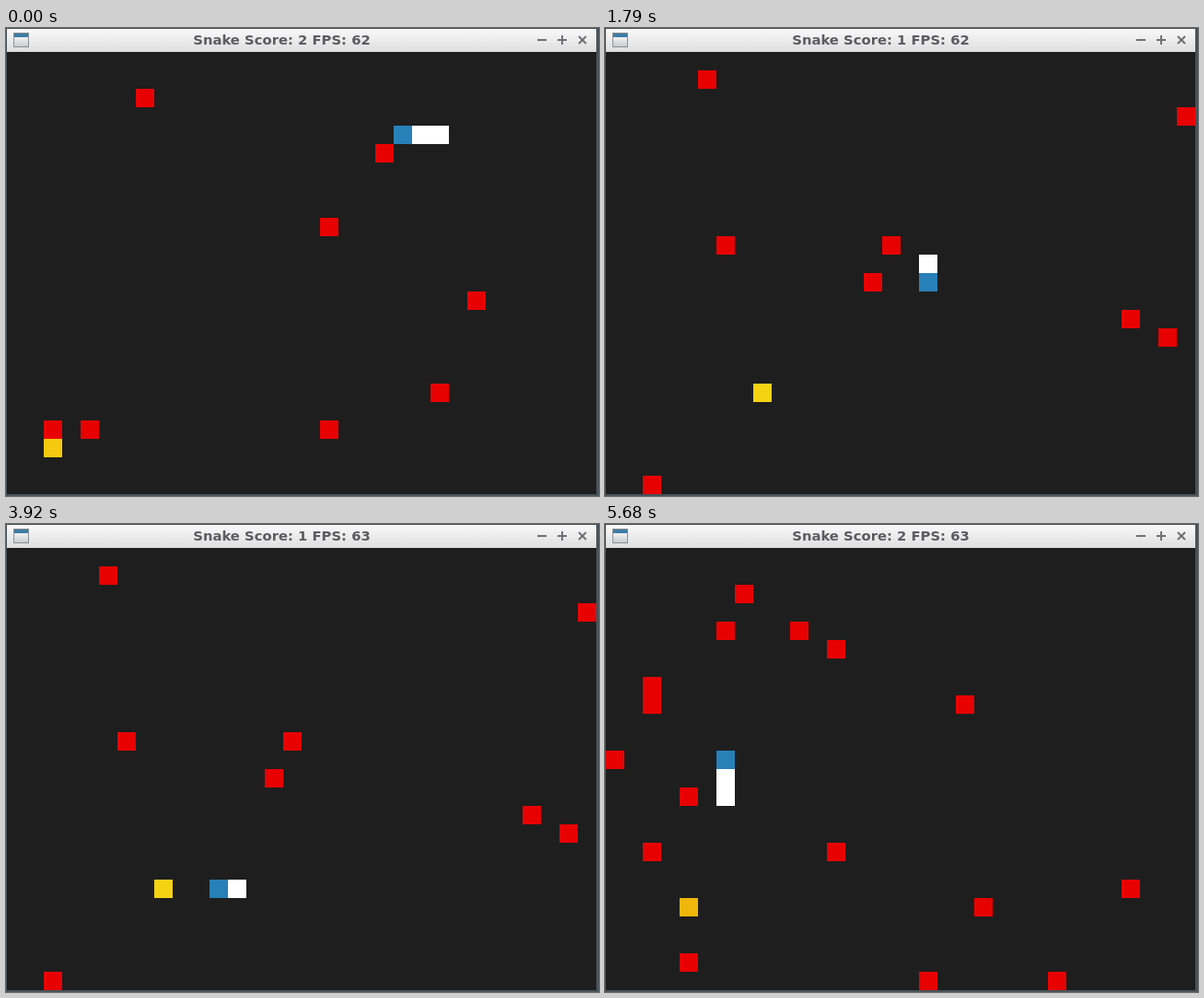
An HTML page with a canvas for the animation above (5760 ms loop, 644 by 508 pixels).

```html
<!DOCTYPE html>
<html lang="en">
<head>
<meta charset="utf-8">
<title>Snake</title>
<style>
  html, body { margin: 0; width: 100%; height: 100%; overflow: hidden; background: #1e1e1e; }
  canvas { display: block; }
</style>
</head>
<body>
<canvas id="stage" width="644" height="508"></canvas>
<script>
const ctx = document.getElementById('stage').getContext('2d');
const LOOP = 5760;
const CELL = 20, LEFT = 1, TOP = 26;

// Each level lasts until the next one starts.
const levels = [
  { start: 0, food: [2, 21],
    walls: [[7, 2], [20, 5], [17, 9], [25, 13], [23, 18], [2, 20], [4, 20], [17, 20]] },
  { start: 1550, food: [8, 18],
    walls: [[5, 1], [31, 3], [6, 10], [15, 10], [14, 12], [28, 14], [30, 15], [2, 23]] },
  { start: 4400, food: [4, 19],
    walls: [[7, 2], [6, 4], [10, 4], [12, 5], [2, 7], [2, 8], [19, 8], [0, 11],
            [4, 13], [2, 16], [12, 16], [28, 18], [20, 19], [4, 22], [17, 23], [24, 23]] }
];

const foodColors = [
  [0, '#f5c90f'], [650, '#f6b10c'], [1550, '#f5d313'], [4400, '#efb70b']
];

// Cells visited by the head, starting with the initial body.
const path = [[23, 4], [22, 4], [21, 4]];
function walk(dx, dy, count) {
  for (let i = 0; i < count; i++) {
    const [x, y] = path[path.length - 1];
    path.push([x + dx, y + dy]);
  }
}
walk(-1, 0, 4);
walk(0, 1, 14);
walk(-1, 0, 11);
walk(0, -1, 7);

// Moments at which the head advances one cell.
const steps = [
  160, 320, 480, 650, 730, 890, 1050, 1130, 1290,
  1550, 1630, 1790, 1960, 2120, 2280, 2440, 2610, 2770, 3030, 3190
];
for (let t = 3440; t <= 4400; t += 160) steps.push(t);
for (let i = 1; i <= 9; i++) steps.push(4400 + 80 * Math.ceil(i * 142 / 80));

function rect(x, y, w, h, color) {
  ctx.fillStyle = color;
  ctx.fillRect(x, y, w, h);
}

function cell([col, row], color) {
  rect(LEFT + col * CELL, TOP + row * CELL, CELL, CELL, color);
}

function line(x1, y1, x2, y2) {
  ctx.beginPath();
  ctx.moveTo(x1, y1);
  ctx.lineTo(x2, y2);
  ctx.stroke();
}

function drawWindow(title) {
  rect(0, 0, 644, 508, '#48535a');
  rect(LEFT, TOP, 640, 480, '#1e1e1e');

  const bar = ctx.createLinearGradient(0, 0, 0, TOP);
  bar.addColorStop(0, '#fafafa');
  bar.addColorStop(1, '#dedede');
  rect(1, 1, 640, TOP - 1, bar);

  rect(8, 5, 17, 16, '#8b8f91');
  rect(9, 6, 15, 4, '#3c7ca6');
  const pane = ctx.createLinearGradient(0, 10, 0, 20);
  pane.addColorStop(0, '#f2f2f2');
  pane.addColorStop(1, '#c9cccd');
  rect(9, 10, 15, 10, pane);

  ctx.fillStyle = '#5c5c60';
  ctx.font = 'bold 14.8px "DejaVu Sans", sans-serif';
  ctx.textAlign = 'center';
  ctx.fillText(title, 299.5, 18);

  ctx.strokeStyle = '#707074';
  ctx.lineWidth = 2;
  line(577, 13, 587, 13);
  line(599, 13, 609, 13);
  line(604, 8, 604, 18);
  line(622, 9, 630, 17);
  line(630, 9, 622, 17);
}

function draw(t) {
  const level = levels.filter(l => l.start <= t).pop();
  const foodColor = foodColors.filter(c => c[0] <= t).pop()[1];
  const head = 2 + steps.filter(s => s <= t).length;
  const score = t >= 1550 && t < 4480 ? 1 : 2;
  const length = t >= 1550 && t < 4560 ? 2 : 3;
  const fps = t < 650 || (t >= 1550 && t < 1960) ? 62 : 63;

  drawWindow(`Snake Score: ${score} FPS: ${fps}`);
  level.walls.forEach(w => cell(w, '#e80000'));
  cell(level.food, foodColor);
  for (let i = 1; i < length; i++) cell(path[head - i], '#ffffff');
  cell(path[head], '#2780b8');
}

const began = performance.now();
function tick() {
  draw((performance.now() - began) % LOOP);
  requestAnimationFrame(tick);
}
tick();
</script>
</body>
</html>
```
